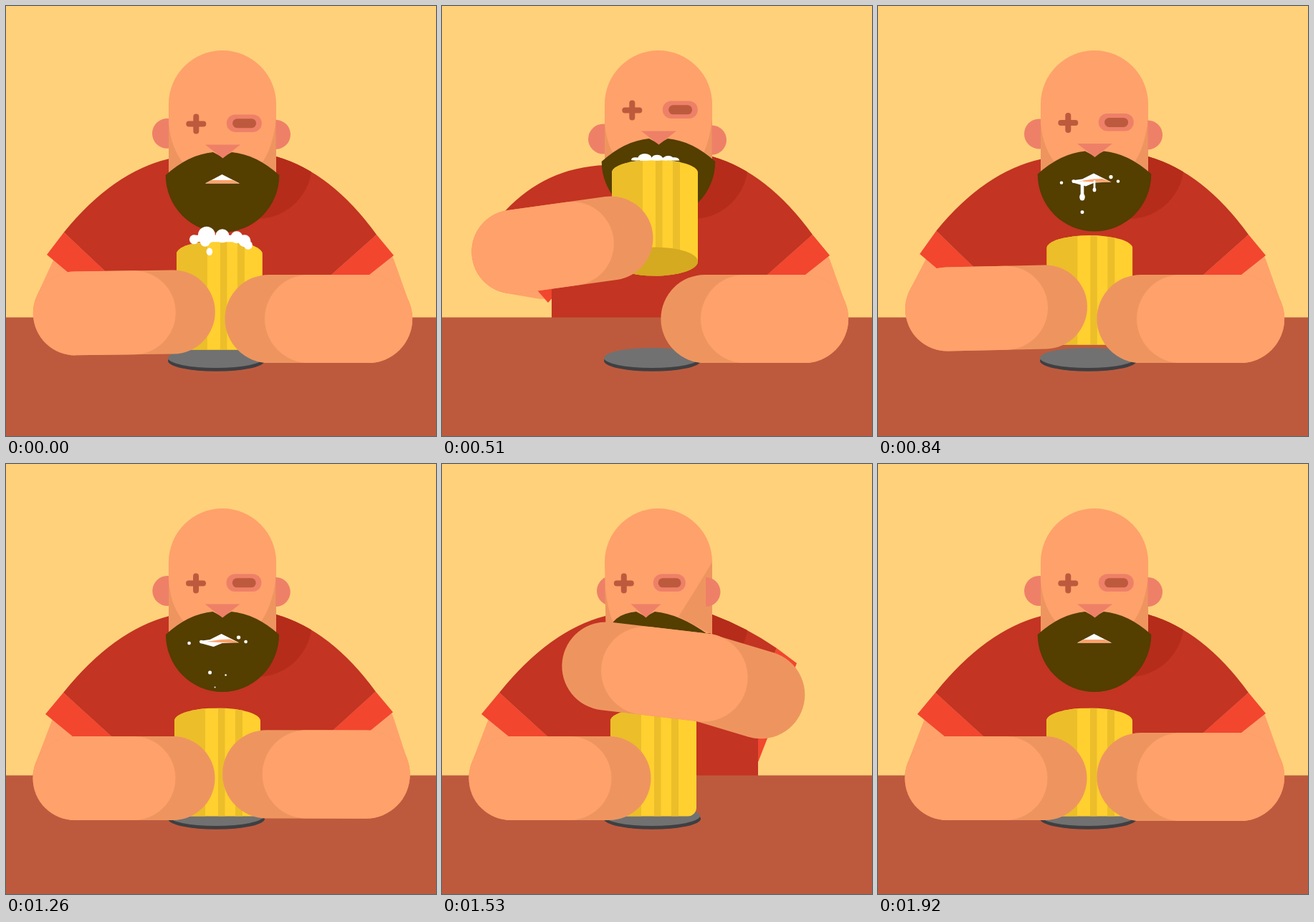
Animation, 600 px wide and 600 px high, one loop 2.19 s. Source, as an HTML page with a canvas:

```html
<!DOCTYPE html>
<html lang="en">
<head>
<meta charset="utf-8">
<title>Cheers</title>
<style>
html, body { margin: 0; width: 100%; height: 100%; overflow: hidden; background: #ffd17a; }
canvas { display: block; }
</style>
</head>
<body>
<canvas id="stage" width="600" height="600"></canvas>
<script>
const ctx = document.getElementById('stage').getContext('2d');
const LOOP = 2190, STEP = 30;
const SKIN = '#ffa16b', SHADE = '#ee955f', ROSE = '#ee8068', BRICK = '#bd5a3d';
const SHIRT = '#c33422', CUFF = '#f2462f', BEARD = '#543e00', WHITE = '#fff';
const BEER = '#ffd02f', BEER_DARK = '#ecbe2a';

const clamp = u => Math.min(1, Math.max(0, u));
const span = (t, a, b) => clamp((t - a) / (b - a));
const lerp = (a, b, k) => a + (b - a) * k;
const mix = (a, b, k) => [lerp(a[0], b[0], k), lerp(a[1], b[1], k)];
const settle = u => 1 - (1 - u ** 1.26) ** 4;
const inOut = u => u < .5 ? 4 * u ** 3 : 1 - 4 * (1 - u) ** 3;

function fill(color, path) {
  ctx.fillStyle = color;
  path ? ctx.fill(path) : ctx.fill();
}
function poly(color, ...pts) {
  ctx.beginPath();
  pts.forEach(p => ctx.lineTo(...p));
  fill(color);
}
function oval(color, x, y, rx, ry = rx) {
  ctx.beginPath();
  ctx.ellipse(x, y, rx, ry, 0, 0, 7);
  fill(color);
}
function box(color, x, y, w, h, r = 0) {
  ctx.beginPath();
  ctx.roundRect(x, y, w, h, r);
  fill(color);
}
function capsule(color, a, b, r) {
  ctx.strokeStyle = color;
  ctx.lineWidth = 2 * r;
  ctx.lineCap = 'round';
  ctx.beginPath();
  ctx.moveTo(...a);
  ctx.lineTo(...b);
  ctx.stroke();
}
function forearm(hand, elbow, r) {
  capsule(SHADE, hand, elbow, r);
  capsule(SKIN, mix(hand, elbow, .402), elbow, r);
}

// lift: raising the mug with the left arm; wipe: right arm across the mouth
function poseAt(t) {
  const lift = t < 570 ? settle(span(t, -30, 510)) : 1 - settle(span(t, 570, 1170));
  const wipe = t <= 1530 ? inOut(span(t, 1200, 1530)) : 1 - settle(span(t, 1530, 1920));
  return { t, lift, wipe };
}

function rightUpperArm(wipe, elbow) {
  const tone = [lerp(255, 238, wipe), lerp(161, 149, wipe), lerp(107, 95, wipe)];
  capsule(`rgb(${tone.map(Math.round)})`, elbow, mix([484, 376], [445, 322], wipe), 61.3);
}

function drawBody({ lift, wipe }, elbowL, elbowR) {
  capsule(SKIN, elbowL, mix([120, 376], [140, 350], lift), 58.7);
  if (wipe < .4) rightUpperArm(wipe, elbowR);

  const topL = mix([80, 319], [88, 286], lift), inL = mix([190, 419], [165, 395], lift);
  const topR = mix([517, 319], [467, 257], wipe), inR = mix([400, 423], [410, 400], wipe);
  poly(CUFF, topL, mix([55, 349], [75, 330], lift), mix([198, 466], [148, 414], lift), inL);
  poly(CUFF, topR, mix([541, 348], [495, 278], wipe), mix([440, 428], [441, 416], wipe), inR);

  const shirt = new Path2D();
  shirt.moveTo(228, 212 + 10 * lift);
  shirt.quadraticCurveTo(...mix([150, 232], [145, 225], lift), ...topL);
  for (const p of [inL, [230, 420], [370, 420], inR, topR]) shirt.lineTo(...p);
  shirt.quadraticCurveTo(...mix([454, 232], [425, 228], wipe), 377, 210);
  shirt.closePath();
  shirt.moveTo(153, 300);
  for (const p of [[153, 436], [441, 436], [441, 300]]) shirt.lineTo(...p);
  shirt.closePath();
  fill(SHIRT, shirt);
  ctx.save();
  ctx.clip(shirt);
  oval('#b52c1a', 350, 220, 77);
  ctx.restore();
}

function drawHead({ t, lift, wipe }) {
  const ear = 177 + 8.5 * lift;
  oval(ROSE, 225 + 12 * wipe, ear, 21);

  const left = 227 + 2 * wipe, head = new Path2D();
  head.moveTo(left, 236);
  head.lineTo(227, 137);
  head.arc(302, 137, 75, Math.PI, 0);
  head.lineTo(377, 236);
  fill(SKIN, head);
  ctx.beginPath();
  ctx.moveTo(227, 163);
  ctx.quadraticCurveTo(230, 200, 250 - 11 * wipe, 222);
  ctx.lineTo(left, 238);
  fill(SHADE);
  ctx.beginPath();
  ctx.moveTo(377, 158 - 21 * wipe);
  ctx.quadraticCurveTo(...mix([372, 200], [354, 175], wipe), ...mix([355, 222], [330, 213], wipe));
  ctx.lineTo(377, 238);
  fill(SHADE);
  ctx.beginPath();
  ctx.arc(376.5 - 8.5 * wipe, ear + 1.5, 20.5, -Math.PI / 2, Math.PI / 2);
  fill(ROSE);

  ctx.save();
  ctx.translate(0, -21 * lift);
  const px = 265.3 - 11.5 * wipe, bx = 332.3 - 15 * wipe, bw = 49 - 4 * wipe;
  capsule(BRICK, [px - 10, 166.5], [px + 10, 166.5], 4);
  capsule(BRICK, [px, 156.5], [px, 176.5], 4);
  box(ROSE, bx - bw / 2, 153.5, bw, 24.5, 12);
  box(BRICK, bx + .3 - (33 - wipe) / 2, 159.3, 33 - wipe, 13, 6.5);

  const cx = 302 - 18 * wipe;
  const wide = 79.3 + 3.2 * Math.sin(Math.PI * span(t, 0, 480));
  const x1 = 302 - wide + 8 * wipe, x2 = 302 + wide - 10 * wipe;
  ctx.beginPath();
  ctx.moveTo(x1, 238);
  ctx.quadraticCurveTo(cx - 47, 209, cx - 13, 206);
  ctx.lineTo(cx, 213);
  ctx.lineTo(cx + 13, 206);
  ctx.quadraticCurveTo(cx + 47, 209, x2, 238);
  ctx.ellipse((x1 + x2) / 2, 238, (x2 - x1) / 2, 80, 0, 0, Math.PI);
  fill(BEARD);
  const nose = 24.5 - 3.5 * wipe;
  poly(ROSE, [cx + .5 - nose, 195.5], [cx + .5 + nose, 195.5], [cx + .5, 214.5]);

  ctx.translate(-18 * wipe, 0);
  if (t >= 570 && t < 1530) drawDribble(t);
  else {
    poly(WHITE, [278, 249.5], [301.5, 237], [326, 249.5]);
    poly(SKIN, [278, 249.5], [287, 245], [316, 245], [326, 249.5]);
  }
  ctx.restore();
}

function drawDribble(t) {
  poly(WHITE, [270, 247], [285, 245], [301, 237], [313, 243], [325, 249], [302, 250], [290, 255], [272, 250]);
  poly(SKIN, [280, 248], [300, 245], [313, 244.5], [326, 249.5], [300, 249]);
  const run = 1 - span(t, 840, 1230);
  if (run > 0) {
    capsule(WHITE, [285, 250], [285, 250 + 20 * run], 2.3);
    oval(WHITE, 285, 250 + 20 * run, 3.8 * run, 5 * run);
    capsule(WHITE, [302, 248], [302, 248 + 12 * run], 1.4);
    oval(WHITE, 302, 248 + 12 * run, 2.4 * run, 3 * run);
  }
  for (const [x, y, r] of [[256, 250, 2.2], [273, 248, 2.3], [325, 242, 2.6], [335, 248, 2.2], [285, 291, 2.4]])
    box(WHITE, x - r, y - r, 2 * r, 2 * r, r * .8);
  if (run < .5) {
    oval(WHITE, 307, 294.5, 1.3);
    oval(WHITE, 292, 311.5, 1);
  }
}

function drawMug({ t, lift }) {
  const full = t < 570;
  const x = full ? 238 - lift : 235 + 2 * lift;
  const top = 340.5 - 126 * lift, base = top + 151 + 11 * lift;
  const tilt = lift ** 3, ry = 20 * tilt;
  const cy = base - ry - 32 * tilt * (1 - tilt);
  const cw = 12 + 48 * lift, ch = 12 + 8 * lift;

  const glass = new Path2D();
  glass.ellipse(x + 60, top + 18, 60, 18, 0, Math.PI, 0);
  glass.ellipse(x + 120 - cw, base - ch, cw, ch, 0, 0, Math.PI / 2);
  glass.ellipse(x + cw, base - ch, cw, ch, 0, Math.PI / 2, Math.PI);
  ctx.save();
  ctx.clip(glass);
  box(BEER, x, top, 120, 170);
  for (const [dx, w] of [[0, 43], [61, 9.5], [85, 10]]) box(BEER_DARK, x + dx, top, w, 170);
  box('#cd9a1e', x, cy, 120, 60);
  oval('#d5aa20', x + 60, cy, 60, ry);
  ctx.restore();

  const foam = 1 - .55 * span(t, 240, 480);
  if (full) {
    ctx.save();
    ctx.translate(x + 60, top + 1);
    ctx.scale(lerp(.6, 1, foam), foam);
    if (t > 300) {
      ctx.beginPath();
      ctx.rect(-70, -40, 140, 46 - 6 * span(t, 300, 480));
      ctx.clip();
    }
    box(WHITE, -37, -9, 74, 9.5, 4);
    for (const [bx, by, r] of [[-35.5, -3, 6.5], [-18, -9, 12], [-20, 0, 7], [4, -8, 9.5],
                               [24, -6, 8.5], [35, -1, 8.5], [40, 5, 6]]) oval(WHITE, bx, by, r);
    oval(WHITE, -14, 14, 4.3, 5.3);
    ctx.restore();
  }
}

function draw(t) {
  const pose = poseAt(t), { lift, wipe } = pose;
  const elbowL = mix([96, 438.5], [100, 343], lift), handL = mix([233, 438.5], [236, 324], lift);
  const elbowR = mix([505.5, 436.5], [365, 298], wipe), handR = mix([367, 436.5], [229, 282], wipe);

  box('#ffd17a', 0, 0, 600, 600);
  drawBody(pose, elbowL, elbowR);
  drawHead(pose);
  box(BRICK, 0, 434.5, 600, 166);
  oval('#3f3f42', 293.5, 495, 67.5, 14.8);
  oval('#717171', 293, 491, 67, 14);
  drawMug(pose);
  forearm(handL, elbowL, 58.5);
  if (wipe >= .4) rightUpperArm(wipe, elbowR);
  forearm(handR, elbowR, 61.6);
}

const start = performance.now();
function tick() {
  const t = (performance.now() - start) % LOOP;
  draw(Math.min(1920, Math.floor(t / STEP) * STEP));
  requestAnimationFrame(tick);
}
tick();
</script>
</body>
</html>
```
